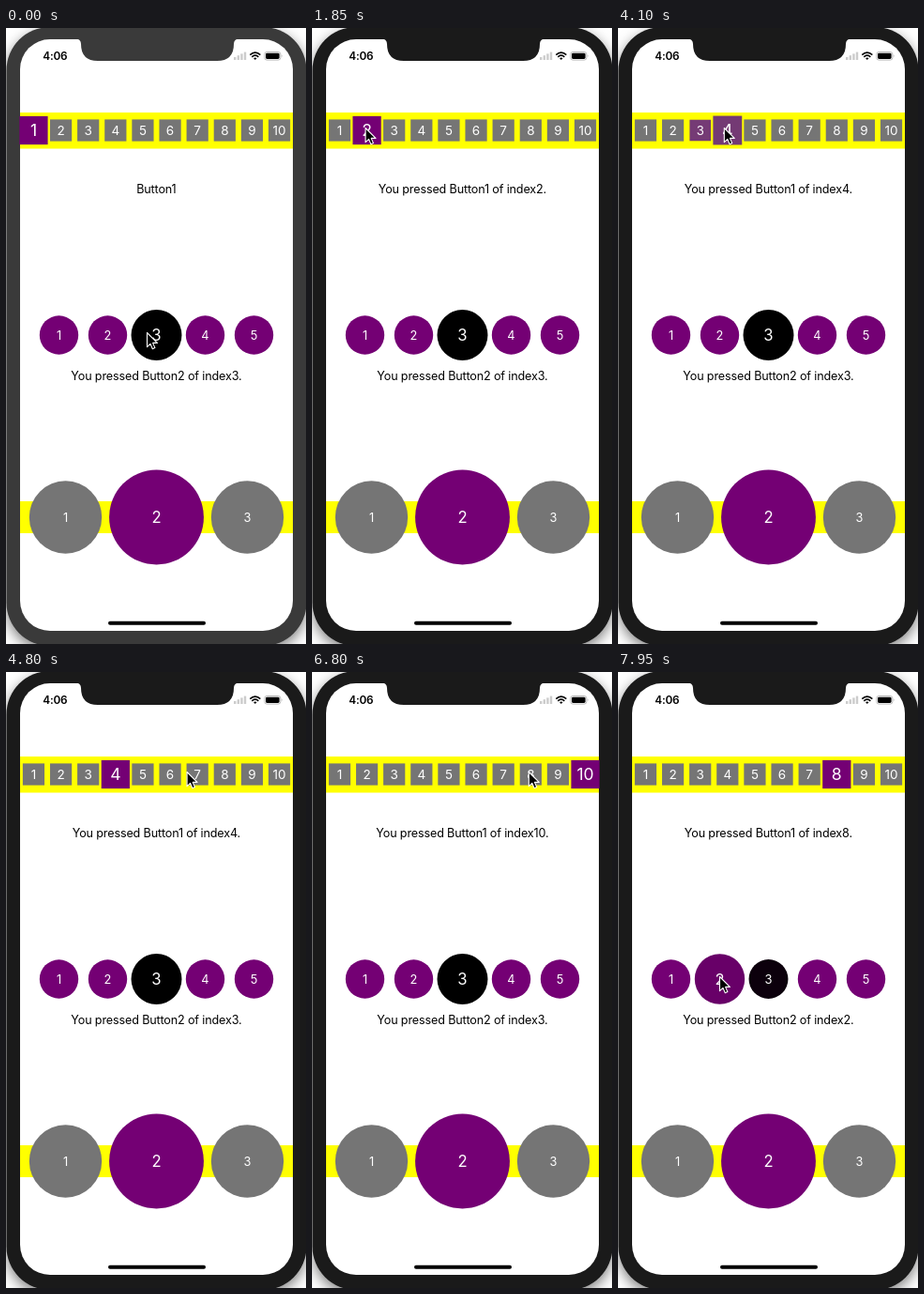
These frames come from a looping animation (320 px wide and 656 px high, 8 s). An HTML page:

```html
<!DOCTYPE html>
<html lang="en">
<head>
<meta charset="utf-8">
<title>Segmented buttons</title>
<style>
  html, body { margin: 0; width: 100%; height: 100%; overflow: hidden; background: #fff; }
  svg { display: block; width: 100vw; height: 100vh; font-family: Inter, Roboto, sans-serif; }
  text { text-anchor: middle; }
  .label { font-size: 12.6px; letter-spacing: -.15px; }
  .digit { fill: #fff; }
  .clock { font-size: 11.8px; font-weight: 600; letter-spacing: -.2px; }
  .body { filter: drop-shadow(0 5px 7px rgba(0, 0, 0, .5)); }
</style>
</head>
<body>
<svg viewBox="0 0 320 656">
  <g id="bezel">
    <rect class="body" x=".5" y="-1" width="320" height="659" rx="46"/>
    <rect x="15" y="12" width="291" height="630" rx="32" fill="#fff"/>
    <path d="M74 11Q80 12 80 17Q80 35 98 35H225Q243 35 243 17Q243 12 249 11Z"/>
  </g>
  <text class="clock" x="52.3" y="34.3">4:06</text>
  <g id="signal" fill="#ccc"></g>
  <g fill="none" stroke="#000" stroke-width="1.7">
    <path d="M260.3 28.6Q265.8 23.6 271.3 28.6M262.3 30.8Q265.8 27.6 269.3 30.8"/>
    <path d="M264.1 32.2Q265.8 30.8 267.5 32.2L265.8 34Z" fill="#000" stroke="none"/>
  </g>
  <rect x="275.8" y="25.5" width="17" height="8.6" rx="2.4" fill="none" stroke="#aaa" stroke-width=".8"/>
  <rect x="277" y="26.7" width="14.6" height="6.2" rx="1.4"/>
  <path d="M293.9 28.3q1.4 1.5 0 3z" fill="#aaa"/>
  <path d="M15 90h291v38.5h-291zM15 504h291v34h-291z" fill="#ff0"/>
  <g id="buttons"></g>
  <text class="label" id="top" x="160.4" y="176"></text>
  <text class="label" id="middle" x="160.4" y="374.7"></text>
  <rect x="109" y="631.7" width="104" height="4" rx="2"/>
  <path id="cursor" d="M0 0V15.2L3.5 11.9L5.8 17.2L8.4 16.1L6.1 10.9H10.9Z" stroke="#fff" stroke-width="1.1" stroke-linejoin="round"/>
</svg>
<script>
const LOOP = 8000, FADE = 200, LEAD = 150, GROWTH = .303;
const PURPLE = [116, 0, 116], GRAY = [117, 117, 117], BLACK = [0, 0, 0];
const byId = id => document.getElementById(id);

function add(parent, tag, attrs) {
  const node = document.createElementNS('http://www.w3.org/2000/svg', tag);
  for (const key in attrs) node.setAttribute(key, attrs[key]);
  return parent.appendChild(node);
}

const top10 = { count: 10, step: 29.12, y: 109, size: 23.2, font: 13.5, off: GRAY, on: PURPLE, selected: 0, label: 'top', name: 'Button1' };
const middle5 = { count: 5, step: 52, y: 327, size: 41.4, font: 12.8, round: true, off: PURPLE, on: BLACK, selected: 2, label: 'middle', name: 'Button2' };
const bottom3 = { count: 3, step: 97, y: 521, size: 77.4, font: 12.8, round: true, off: GRAY, on: PURPLE, selected: 1 };
const rows = [top10, middle5, bottom3];

// The pointer leaves for a button, clicks it, and may rest beside its centre.
const clicks = [
  { leave: -900, at: -500, row: middle5, index: 2, nudge: -10 },
  { leave: 50, at: 1050, row: top10, index: 0, nudge: 6 },
  { leave: 1300, at: 1650, row: top10, index: 1, nudge: -1.5 },
  { leave: 2400, at: 3000, row: top10, index: 2 },
  { leave: 3400, at: 4000, row: top10, index: 3, nudge: -3.5 },
  { leave: 4250, at: 5600, row: top10, index: 9, nudge: 3.5 },
  { leave: 5850, at: 6950, row: top10, index: 7, nudge: -2 },
  { leave: 7640, at: 7930, row: middle5, index: 1 }
];
const ACTIVATE = clicks[1].at;

const buttonX = (row, i) => 160.5 + (i - (row.count - 1) / 2) * row.step;

for (const row of rows) {
  row.presses = [{ at: -LOOP, index: row.selected }];
  for (const click of clicks.filter(c => c.row === row))
    if (click.index !== row.presses.at(-1).index) row.presses.push(click);

  const { size } = row;
  row.buttons = Array.from({ length: row.count }, (_, i) => {
    const group = add(byId('buttons'), 'g');
    const shape = add(group, 'rect', { x: -size / 2, y: -size / 2, width: size, height: size, rx: row.round ? size / 2 : 0 });
    add(group, 'text', { class: 'digit', 'font-size': row.font, y: row.font * .364 }).textContent = i + 1;
    return { group, shape };
  });
}

for (let i = 0; i < 4; i++) {
  const height = 3 + 1.8 * i;
  add(byId('signal'), 'rect', { x: 243 + 3.6 * i, y: 34 - height, width: 2.4, height });
}

const lerp = (a, b, p) => a + (b - a) * p;
const smooth = p => p * p * (3 - 2 * p);
const mix = (a, b, p) => `rgb(${a.map((v, i) => Math.round(lerp(v, b[i], p)))})`;

// Quick spring: passes 1 after 23 ms, overshoots once and settles.
const spring = age => 1 - (1 - age / 23) * Math.exp(-age / 28);

function drawRow(row, t) {
  const n = row.presses.findLastIndex(press => press.at <= t);
  const { at, index } = row.presses[n];
  const previous = n > 0 ? row.presses[n - 1].index : -1;
  const size = spring(t - at), tint = Math.min(1, (t - at) / FADE);
  row.buttons.forEach(({ group, shape }, i) => {
    const blend = value => i === index ? value : i === previous ? 1 - value : 0;
    group.setAttribute('transform', `translate(${buttonX(row, i)} ${row.y}) scale(${1 + GROWTH * blend(size)})`);
    shape.setAttribute('fill', mix(row.off, row.on, blend(tint)));
  });
  if (!row.label) return;
  const untouched = row === top10 && n === 0;
  byId(row.label).textContent = untouched ? row.name : `You pressed ${row.name} of index${index + 1}.`;
}

const restPoint = ({ row, index, nudge = 0 }) => [buttonX(row, index) + nudge, row.y - 2.5];

function pointer(t) {
  const n = clicks.findLastIndex(click => click.leave <= t);
  const click = clicks[n], goal = restPoint(click);
  if (n === 0) return goal;
  const p = Math.min(1, (t - click.leave) / (click.at - LEAD - click.leave));
  return restPoint(clicks[n - 1]).map((v, i) => lerp(v, goal[i], smooth(p)));
}

function draw(t) {
  byId('bezel').setAttribute('fill', t < ACTIVATE ? '#3a3a3a' : '#1a1a1a');
  rows.forEach(row => drawRow(row, t));
  byId('cursor').setAttribute('transform', `translate(${pointer(t)})`);
}

const start = performance.now();
function tick() {
  draw((performance.now() - start) % LOOP);
  requestAnimationFrame(tick);
}
tick();
</script>
</body>
</html>
```
